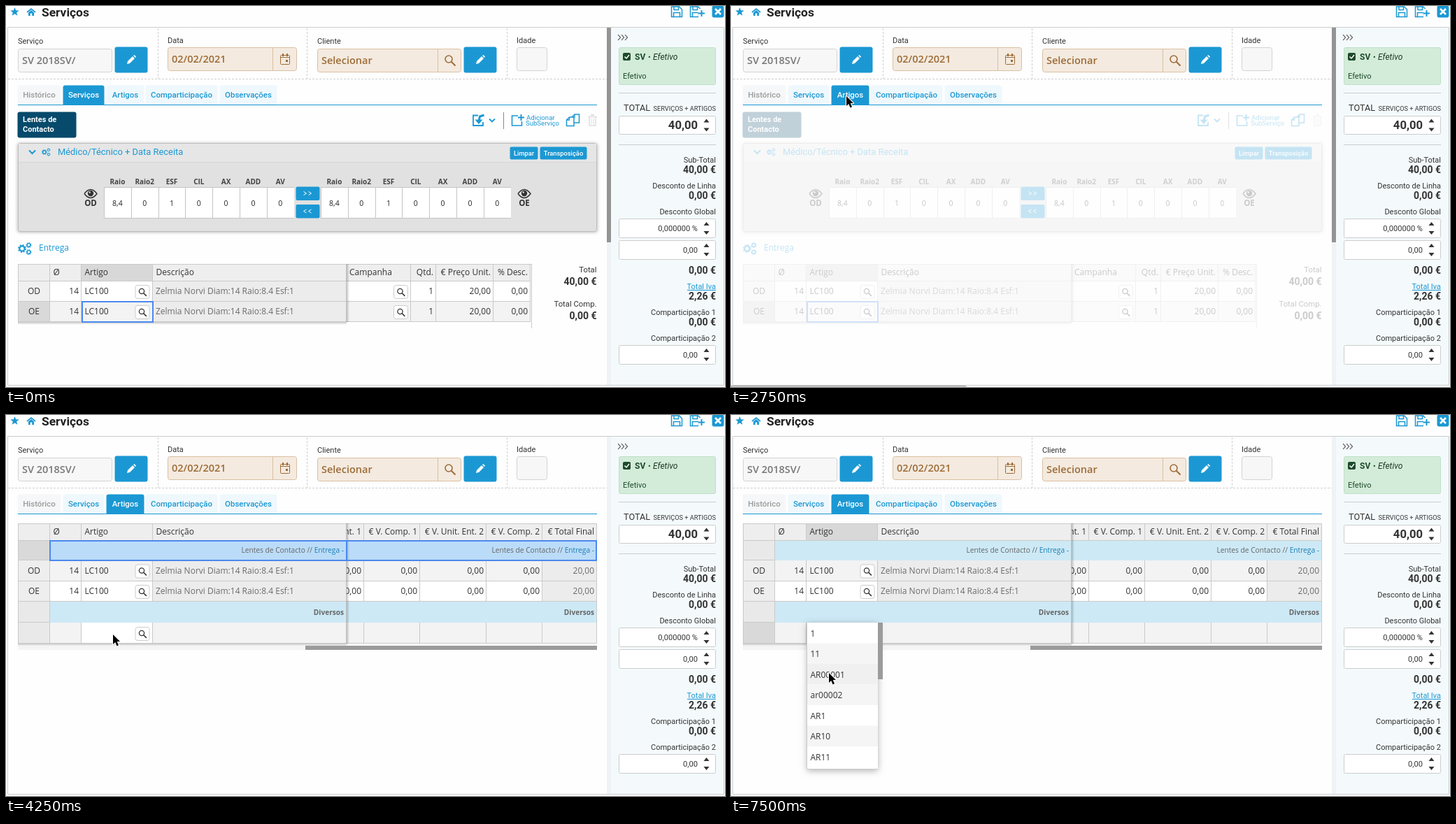
An HTML page with a canvas that plays this animation: 1028x545 px, repeating every 8000 ms.

```html
<!DOCTYPE html>
<html lang="pt">
<head>
<meta charset="utf-8">
<title>Serviços</title>
<style>
html, body { margin: 0; width: 100%; height: 100%; overflow: hidden; background: #fff; }
canvas { display: block; width: 1028px; height: 545px; }
</style>
</head>
<body>
<canvas id="stage"></canvas>
<script>
const W = 1028, H = 545, LOOP = 8000, STEP = 250;
const BLUE = '#1b98d3', INK = '#333', MUTED = '#6c6c6c', GRID = '#cacaca', BROWN = '#9c6c38';
const canvas = document.getElementById('stage');
const ctx = canvas.getContext('2d');
const ratio = window.devicePixelRatio || 1;
canvas.width = W * ratio;
canvas.height = H * ratio;

const roboto = (size, weight = 400) => `${weight} ${size}px Roboto, sans-serif`;
const open = (size, weight = 400) => `${weight} ${size}px "Open Sans", sans-serif`;
const CELL = open(12);

function text(s, x, y, font, color = INK, align = 'left') {
  ctx.font = font;
  ctx.fillStyle = color;
  ctx.textAlign = align;
  ctx.fillText(s, x, y);
}

function fill(x0, y0, x1, y1, color) {
  ctx.fillStyle = color;
  ctx.fillRect(x0, y0, x1 - x0, y1 - y0);
}

// Bordered boxes sit on the pixel grid, solid ones get a soft edge
function box(x0, y0, x1, y1, color, border, radius = 0) {
  ctx.beginPath();
  const e = border ? 0.5 : -0.5;
  ctx.roundRect(x0 + e, y0 + e, x1 - x0 - 2 * e, y1 - y0 - 2 * e, radius);
  if (color) { ctx.fillStyle = color; ctx.fill(); }
  if (border) { ctx.strokeStyle = border; ctx.lineWidth = 1; ctx.stroke(); }
}

function path(points, color, width = 1, close = false) {
  ctx.beginPath();
  points.forEach(([x, y]) => ctx.lineTo(x, y));
  if (close) ctx.closePath();
  ctx.strokeStyle = color;
  ctx.lineWidth = width;
  ctx.stroke();
}

function shape(points, color) {
  ctx.beginPath();
  points.forEach(([x, y]) => ctx.lineTo(x, y));
  ctx.fillStyle = color;
  ctx.fill();
}

function ring(x, y, r, color, width) {
  ctx.beginPath();
  ctx.arc(x, y, r, 0, 7);
  ctx.strokeStyle = color;
  ctx.lineWidth = width;
  ctx.stroke();
}

function dot(x, y, r, color) {
  ctx.beginPath();
  ctx.arc(x, y, r, 0, 7);
  ctx.fillStyle = color;
  ctx.fill();
}

function fade(x0, y0, x1, y1, down) {
  const g = ctx.createLinearGradient(x0, y0, down ? x0 : x1, down ? y1 : y0);
  g.addColorStop(0, 'rgba(0,0,0,.22)');
  g.addColorStop(1, 'rgba(0,0,0,0)');
  fill(x0, y0, x1, y1, g);
}

function withShadow(blur, offset, draw) {
  ctx.save();
  ctx.shadowColor = 'rgba(0,0,0,.3)';
  ctx.shadowBlur = blur;
  ctx.shadowOffsetY = offset;
  draw();
  ctx.restore();
}

function dashed(points) {
  ctx.setLineDash([3, 2]);
  path(points, '#cfcfcf');
  ctx.setLineDash([]);
}

// Icons
function lens(x, y, r, color, width) {
  ring(x, y, r, color, width);
  path([[x + r * 0.75, y + r * 0.75], [x + r * 1.9, y + r * 1.9]], color, width * 1.2);
}

function searchButton(x, cy, color = INK) {
  box(x, cy - 10, x + 21, cy + 10, '#fff', '#ccc', 3);
  lens(x + 9.5, cy - 1, 3.6, color, 1.3);
}

function pencilButton(x, y) {
  box(x, y, x + 46, y + 36, BLUE, null, 3);
  const cx = x + 23, cy = y + 18;
  shape([[cx - 6, cy + 6], [cx - 5, cy + 2], [cx + 2, cy - 5], [cx + 5, cy - 2], [cx - 2, cy + 5]], '#fff');
  shape([[cx + 3, cy - 6], [cx + 4.5, cy - 7], [cx + 7, cy - 4.5], [cx + 6, cy - 3]], '#fff');
}

function gear(x, y, r) {
  ring(x, y, r * 0.6, BLUE, r * 0.36);
  const tooth = r * 0.85 * Math.PI / 8;
  ctx.setLineDash([tooth, tooth]);
  ring(x, y, r * 0.85, BLUE, r * 0.3);
  ctx.setLineDash([]);
}

function gears(x, y, s) {
  gear(x + 6 * s, y, 6 * s);
  gear(x + 15.5 * s, y - 5 * s, 4 * s);
  gear(x + 15.5 * s, y + 5 * s, 4 * s);
}

function eye(x, y) {
  ctx.beginPath();
  ctx.moveTo(x - 9, y);
  ctx.quadraticCurveTo(x, y - 12, x + 9, y);
  ctx.quadraticCurveTo(x, y + 12, x - 9, y);
  ctx.strokeStyle = INK;
  ctx.lineWidth = 1.5;
  ctx.stroke();
  dot(x, y - 0.5, 4.2, INK);
  dot(x - 1.3, y - 2, 1.2, '#ddd');
}

function floppy(x) {
  path([[x, 1], [x + 11, 1], [x + 15, 5], [x + 15, 15.5], [x, 15.5]], BLUE, 1.5, true);
  path([[x + 3.5, 1], [x + 3.5, 5.5], [x + 10, 5.5], [x + 10, 1]], BLUE, 1.5);
  path([[x + 3, 15], [x + 3, 9.5], [x + 12, 9.5], [x + 12, 15]], BLUE, 1.5);
}

function plus(x, y, r) {
  path([[x - r, y], [x + r, y]], BLUE, 2);
  path([[x, y - r], [x, y + r]], BLUE, 2);
}

function sheet(x, y, w, h) {
  const fold = 4;
  const edge = [[x + fold, y], [x + w, y], [x + w, y + h], [x, y + h], [x, y + fold]];
  shape(edge, '#fefefe');
  path(edge, BLUE, 1.5, true);
  path([[x + fold, y], [x + fold, y + fold], [x, y + fold]], BLUE, 1.3);
}

function pointer(x, y) {
  const p = [[0, 0], [0, 14], [3.2, 11], [5.6, 16.4], [8, 15.3], [5.7, 10], [10, 10]]
    .map(([dx, dy]) => [x + dx, y + dy]);
  ctx.lineJoin = 'round';
  path(p, '#fff', 2.2, true);
  ctx.lineJoin = 'miter';
  shape(p, '#000');
}

// Page frame
function header() {
  const star = Array.from({ length: 10 }, (_, i) => {
    const r = i % 2 ? 2.8 : 6.6, a = i * Math.PI / 5 - Math.PI / 2;
    return [12.5 + r * Math.cos(a), 8.5 + r * Math.sin(a)];
  });
  shape(star, BLUE);
  path([[30, 9], [36, 4], [42, 9]], BLUE, 1.7);
  shape([[32, 9.5], [36, 6], [40, 9.5], [40, 14], [37.3, 14], [37.3, 10.5], [34.7, 10.5], [34.7, 14], [32, 14]], BLUE);
  text('Serviços', 51, 15, roboto(17.4, 700), '#222');
  floppy(951.5);
  floppy(978.5);
  fill(990, 4, 1000, 17, '#fff');
  plus(994.5, 10.5, 4.5);
  box(1010, 0, 1026, 16, BLUE, null, 3);
  path([[1014, 4], [1022, 12]], '#fff', 2.6);
  path([[1022, 4], [1014, 12]], '#fff', 2.6);
}

function fields() {
  const label = roboto(11), value = open(14.5, 600);
  dashed([[3, 104.5], [859, 104.5]]);
  for (const x of [217.5, 430.5, 716.5]) dashed([[x, 32], [x, 104]]);
  text('Serviço', 17, 54, label);
  text('Data', 231, 53, label);
  text('Cliente', 445, 54, label);
  text('Idade', 730, 53, label);
  box(17, 61, 152, 95, '#f7f7f7', '#d3d3d3', 3);
  text('SV 2018SV/', 23, 83, value, '#777');
  pencilButton(156, 59);
  box(231, 59, 416, 93, '#f4eadf', '#d9c0a3', 3);
  fill(381, 60, 382, 92, '#d9c0a3');
  text('02/02/2021', 237, 81, value, BROWN);
  box(392, 70, 406, 84, null, BROWN, 1);
  fill(392, 73, 406, 74, BROWN);
  fill(395, 68, 397, 72, BROWN);
  fill(401, 68, 403, 72, BROWN);
  fill(400, 77, 403, 80, BROWN);
  box(445, 61, 651, 95, '#f4eadf', '#d9c0a3', 3);
  fill(617, 62, 618, 94, '#d9c0a3');
  text('Selecionar', 451, 83, value, BROWN);
  lens(633, 76, 5, BROWN, 1.6);
  pencilButton(655, 59);
  box(730, 59, 774, 93, '#f7f7f7', '#d3d3d3', 3);
}

function tabs(active, hovered) {
  const list = [['Histórico', 17, 78], ['Serviços', 82, 140], ['Artigos', 144, 197],
    ['Comparticipação', 200, 302], ['Observações', 306, 387]];
  list.forEach(([name, x0, x1], i) => {
    const on = i === active;
    box(x0, 114, x1, 141, on ? BLUE : i ? '#eff8fc' : '#f5f7f8', null, [3, 3, 0, 0]);
    const color = on ? '#fff' : !i ? '#9b9b9b' : i === hovered ? '#1c3f52' : BLUE;
    text(name, (x0 + x1) / 2, 131, roboto(11.45, 500), color, 'center');
  });
  fill(17, 141, 845, 142, BLUE);
}

function spinner(y0, y1, value, font, baseline) {
  box(876, y0, 1015, y1, '#fff', '#ccc', 2);
  text(value, 989, baseline, font, INK, 'right');
  const y = (y0 + y1) / 2;
  shape([[997.5, y - 4], [1005.5, y - 4], [1001.5, y - 9]], INK);
  shape([[997.5, y + 4], [1005.5, y + 4], [1001.5, y + 9]], INK);
}

function sidebar() {
  fill(865, 31, 1026, 542, '#f4fafc');
  for (const x of [875, 880, 885]) path([[x, 41], [x + 3.5, 45], [x, 49]], '#444', 1.1);
  box(876, 59, 1015, 113, '#d3ecd9', '#c0dfc7', 2);
  box(882.5, 67.5, 892.5, 77.5, '#1d4a2b', null, 2);
  path([[884.5, 72.5], [887, 75], [891, 70]], '#fff', 1.5);
  text('SV', 899, 77, roboto(12, 700), '#1d4a2b');
  text('•', 918, 77, roboto(11), '#1d4a2b');
  text('Efetivo', 925, 77, 'italic ' + roboto(12), '#1d3a26');
  text('Efetivo', 882, 104, roboto(11), '#1d4a2b');
  fill(876, 124, 1015, 125, '#c9cdcf');
  fill(876, 198, 1015, 199, '#c9cdcf');
  text('TOTAL', 883, 150, roboto(12.7));
  text('SERVIÇOS + ARTIGOS', 1015, 150, roboto(9.2), INK, 'right');
  spinner(157, 184, '40,00', roboto(16.6, 700), 176);
  const label = (s, y, color) => text(s, 1015, y, roboto(11), color, 'right');
  const amount = (s, y) => text(s, 1015, y, roboto(14, 700), INK, 'right');
  label('Sub-Total', 224);
  amount('40,00 €', 239);
  label('Desconto de Linha', 261);
  amount('0,00 €', 276);
  label('Desconto Global', 298);
  spinner(304, 332, '0,000000 %', roboto(11.1), 322);
  spinner(335, 363, '0,00', roboto(11.1), 353);
  amount('0,00 €', 383);
  label('Total Iva', 405, BLUE);
  fill(974, 406, 1015, 407, BLUE);
  amount('2,26 €', 420);
  label('Comparticipação 1', 442);
  amount('0,00 €', 457);
  label('Comparticipação 2', 479);
  spinner(485, 513, '0,00', roboto(11.1), 503);
}

// Tables
const FROZEN = [['', 17, 63], ['Ø', 63, 108], ['Artigo', 108, 210], ['Descrição', 210, 487]];
const FIRST = [['Campanha', 487, 579], ['Qtd.', 579, 615, '1'], ['€ Preço Unit.', 615, 697, '20,00'],
  ['% Desc.', 697, 750, '0,00'], ['€ V. Desc. Lin.', 750, 836, '0,00'], ['€', 836, 930]];
const LAST = [['€ V. Unit. Ent. 1', 417, 512, '0,00'], ['€ V. Comp. 1', 512, 592, '0,00'],
  ['€ V. Unit. Ent. 2', 592, 687, '0,00'], ['€ V. Comp. 2', 687, 767, '0,00'], ['€ Total Final', 767, 845, '20,00']];

function cell(x0, x1, y0, y1, color) {
  fill(x0, y0, x1, y1, color);
  fill(x1 - 1, y0, x1, y1, GRID);
  fill(x0, y1 - 1, x1, y1, GRID);
}

function clipColumns(right, draw) {
  ctx.save();
  ctx.beginPath();
  ctx.rect(487, 140, right - 487, 400);
  ctx.clip();
  draw();
  ctx.restore();
}

function headRow(y, cols, right, activeArticle) {
  const base = y + 16;
  for (const [name, x0, x1] of FROZEN) {
    cell(x0, x1, y, y + 25, name === 'Artigo' && activeArticle ? '#d8d8d8' : '#eee');
    text(name, x0 + 4.5, base, CELL);
  }
  clipColumns(right, () => {
    for (const [name, x0, x1, value] of cols) {
      cell(x0, x1, y, y + 25, '#eee');
      if (value) text(name, x1 - 4, base, CELL, INK, 'right');
      else text(name, x0 + 4, base, CELL);
    }
  });
  fill(17, y, right, y + 1, GRID);
}

function productRow(side, y0, y1, cols, right, color, headColor) {
  const mid = (y0 + y1) / 2, base = Math.floor(mid + 4.4);
  cell(17, 63, y0, y1, headColor);
  text(side, 40, base, CELL, INK, 'center');
  cell(63, 108, y0, y1, color);
  text('14', 104, base, CELL, INK, 'right');
  cell(108, 210, y0, y1, color);
  text('LC100', 112.5, base, CELL);
  searchButton(184.5, mid + 0.5);
  cell(210, 487, y0, y1, '#ececec');
  text('Zelmia Norvi Diam:14 Raio:8.4 Esf:1', 214, base, CELL, MUTED);
  clipColumns(right, () => {
    for (const [name, x0, x1, value] of cols) {
      const total = name === '€ Total Final';
      cell(x0, x1, y0, y1, total ? '#ececec' : color);
      if (value) text(value, x1 - 4, base, CELL, total ? MUTED : INK, 'right');
      if (name === 'Campanha') searchButton(554, mid + 0.5);
    }
  });
}

function frozenShadow(y0, y1) {
  fill(486, y0, 487, y1, '#c2c2c2');
  fade(487, y0, 491, y1, false);
  fade(17, y1, 487, y1 + 4, true);
}

function outline(x0, x1, y0, y1) {
  ctx.strokeStyle = '#4b89f0';
  ctx.lineWidth = 2;
  ctx.strokeRect(x0, y0, x1 - x0, y1 - y0);
}

function toolbar() {
  path([[675, 156.5], [668, 156.5], [668, 171], [682, 171], [682, 166]], BLUE, 1.8);
  path([[683.5, 156], [677.5, 158], [676, 165]], BLUE, 3);
  shape([[670.5, 162.5], [681.5, 162.5], [676, 169]], BLUE);
  path([[691, 161.5], [695, 165.5], [699, 161.5]], BLUE, 1.8);
  fill(711, 152, 712, 176, '#888');
  path([[732, 157], [723.5, 157], [723.5, 171], [737.5, 171], [737.5, 165]], BLUE, 1.6);
  plus(736.5, 159.5, 4.5);
  text('Adicionar', 744, 163, roboto(9.6), BLUE);
  text('SubServiço', 743, 171, roboto(9.6), BLUE);
  sheet(809, 155, 10.5, 12);
  sheet(801.5, 159, 10.5, 12.5);
  path([[832, 158.5], [845, 158.5]], '#ddd', 1.5);
  path([[834, 159], [834, 171], [843, 171], [843, 159]], '#ddd', 1.4);
  for (const x of [837, 840]) path([[x, 161], [x, 169]], '#ddd', 1);
  fill(836, 155, 841, 157, '#ddd');
}

function prescription() {
  box(17, 152, 100, 188, '#074a6b', null, 3);
  text('Lentes de', 24, 166, roboto(11, 700), '#fff');
  text('Contacto', 24, 180, roboto(11, 700), '#fff');
  toolbar();

  withShadow(4, 1, () => box(17, 196, 845, 322, '#e1e1e1', null, 3));
  box(17, 196, 845, 323, null, '#bdbdbd', 3);
  fill(18, 197, 844, 223, '#e6e6e6');
  fill(18, 223, 844, 224, '#d6d6d6');
  path([[33, 206.5], [37.5, 211], [42, 206.5]], BLUE, 2);
  gears(51, 209, 0.64);
  text('Médico/Técnico + Data Receita', 74, 213, roboto(12.9), BLUE);
  box(721, 202, 760, 219, BLUE, null, 2);
  text('Limpar', 740.5, 214, roboto(9.3, 500), '#fff', 'center');
  box(764, 202, 830, 219, BLUE, null, 2);
  text('Transposição', 797, 214, roboto(9.3, 500), '#fff', 'center');

  const names = ['Raio', 'Raio2', 'ESF', 'CIL', 'AX', 'ADD', 'AV'];
  const values = ['8,4', '0', '1', '0', '0', '0', '0'];
  for (const left of [140, 450]) {
    fill(left, 259, left + 272, 304, '#c4c4c4');
    names.forEach((name, i) => {
      const x = left + i * 38.8, mid = x + 19.4;
      fill(Math.round(x) + 1, 260, Math.round(x + 38.8), 303, '#fff');
      text(name, mid, 255, open(10, 700), '#444', 'center');
      text(values[i], mid, 286, open(10.5), '#222', 'center');
    });
  }
  [[259, 1], [284.5, -1]].forEach(([y, dir]) => {
    box(415, y, 448, y + 18.5, BLUE, null, 2);
    for (const x of [427.5, 434.5]) {
      path([[x - 2 * dir, y + 6.5], [x + 2 * dir, y + 9], [x - 2 * dir, y + 11.5]], '#fff', 1);
    }
  });
  eye(121, 268.5);
  text('OD', 121, 286, open(11.5, 700), INK, 'center');
  eye(741, 268.5);
  text('OE', 741, 286, open(11.5, 700), INK, 'center');

  gears(17, 347, 1);
  text('Entrega', 47, 350, open(12), BLUE);
  const cols = FIRST.slice(0, 4);
  headRow(369, cols, 751, true);
  productRow('OD', 394, 423, cols, 751, '#fff', '#f0f0f0');
  productRow('OE', 423, 452, cols, 751, '#f3f3f3', '#d9d9d9');
  frozenShadow(369, 452);
  fill(17, 369, 18, 452, GRID);
  fill(751, 369, 752, 461, GRID);
  outline(109, 210, 423, 452);
  const right = (s, y, font) => text(s, 844.5, y, font, INK, 'right');
  right('Total', 381, roboto(11.3));
  right('40,00 €', 399, roboto(14, 700));
  right('Total Comp.', 430, roboto(11.3));
  right('0,00 €', 448, roboto(14, 700));
}

function groupTitle(right) {
  text('Entrega -', right, 197, open(10.2), '#1a7fb4', 'right');
  const gap = ctx.measureText('Entrega -').width;
  text('Lentes de Contacto // ', right - gap, 197, open(10.2), '#666', 'right');
}

function articles({ scrolled, rowSelected, cellSelected }) {
  const cols = scrolled ? LAST : FIRST;
  headRow(155, cols, 845, cellSelected);
  for (const [y0, y1] of [[180, 208], [267, 297]]) {
    const chosen = rowSelected && y0 === 180;
    cell(17, 63, y0, y1, chosen ? '#d9d9d9' : '#e9e9e9');
    fill(63, y0, 845, y1, chosen ? '#bbdcf8' : '#cde9f5');
  }
  productRow('OD', 208, 238, cols, 845, '#f3f3f3', '#eee');
  productRow('OE', 238, 267, cols, 845, '#fff', '#eee');
  for (const right of scrolled ? [483, 841] : [483]) {
    groupTitle(right);
    text('Diversos', right, 286, open(10.1, 700), '#666', 'right');
  }
  for (const [name, x0, x1] of FROZEN) {
    cell(x0, x1, 297, 327, name === 'Artigo' ? '#fff' : name ? '#f3f3f3' : cellSelected ? '#d9d9d9' : '#e9e9e9');
  }
  clipColumns(845, () => cols.forEach(([, x0, x1]) => cell(x0, x1, 297, 327, '#f3f3f3')));
  searchButton(184.5, 313);
  if (!scrolled) searchButton(554, 313, '#999');
  frozenShadow(155, 327);
  fill(17, 155, 18, 327, GRID);
  fill(844, 155, 845, 327, GRID);
  fill(17, 330, 845, 336, '#f4f4f4');
  const thumb = scrolled ? 428 : 17;
  fill(thumb, 330, thumb + 417, 336, '#9b9b9b');
  if (rowSelected) {
    outline(63, 487, 180, 208);
    outline(487, 844, 180, 208);
  }
}

function editor(caret) {
  withShadow(8, 2, () => fill(109, 298, 210, 327, '#fff'));
  if (caret) fill(113, 299, 114, 316, '#000');
}

function dropdown(pointerY) {
  const items = ['1', '11', 'AR00001', 'ar00002', 'AR1', 'AR10', 'AR11'];
  const rowHeight = 29.5, hovered = Math.floor((pointerY - 297) / rowHeight);
  withShadow(9, 2, () => fill(109, 297, 210, 507, '#fff'));
  items.forEach((item, i) => {
    const y = 297 + i * rowHeight;
    fill(109, y, 210, Math.min(y + rowHeight, 507), i === hovered ? '#f0f0f0' : i % 2 ? '#f5f5f5' : '#fff');
    text(item, 113.5, Math.floor(y + 20), CELL);
  });
  fill(108, 297, 109, 507, '#ccc');
  fill(108, 506, 210, 507, '#ccc');
  fill(210, 297, 217, 378, '#9b9b9b');
}

// Timeline: [time, x, y] of the pointer tip
const MOVES = [[500, 776, 189], [750, 610, 128], [1000, 400, 67], [1250, 225, 100], [1500, 165, 129],
  [3250, 167, 129], [3750, 164, 188], [4250, 153, 314], [4500, 148, 313],
  [6750, 147, 325], [7000, 143, 349], [7250, 140, 369]];

function draw(t) {
  const at = MOVES.filter(([time]) => time <= t).pop();
  const onArticles = t >= 2750;
  ctx.setTransform(ratio, 0, 0, ratio, 0, 0);
  fill(0, 0, W, H, '#fefefe');
  header();
  fields();
  tabs(onArticles ? 2 : 1, t >= 1500 && !onArticles ? 2 : -1);
  if (t < 3000) prescription();
  else articles({ scrolled: t >= 4000, rowSelected: t >= 4000 && t < 4500, cellSelected: t >= 4500 });
  const veil = t === 2750 ? 0.75 : t === 3000 ? 0.5 : 0;
  if (veil) fill(3, 143, 857, 541, `rgba(254,254,254,${veil})`);

  fill(859, 31, 865, 542, '#eff3f5');
  if (t < 3000) fill(859, 31, 865, 338, '#949494');
  sidebar();
  box(2, 30, 1027, 543, null, '#c9cccd');
  if (t >= 1750 && t < 4000) box(-4, 543, 337, 550, '#d8d8d8', '#a5a5a5', 2);

  if (t >= 6250) dropdown(at[2]);
  else if (t >= 4500) {
    if (t >= 5250) editor(t < 5750);
    outline(109, 210, 297, 326);
  }
  if (at) pointer(at[1], at[2]);
}

const start = performance.now();
function tick() {
  const t = (performance.now() - start) % LOOP;
  draw(Math.floor(t / STEP) * STEP);
  requestAnimationFrame(tick);
}
tick();
</script>
</body>
</html>
```
